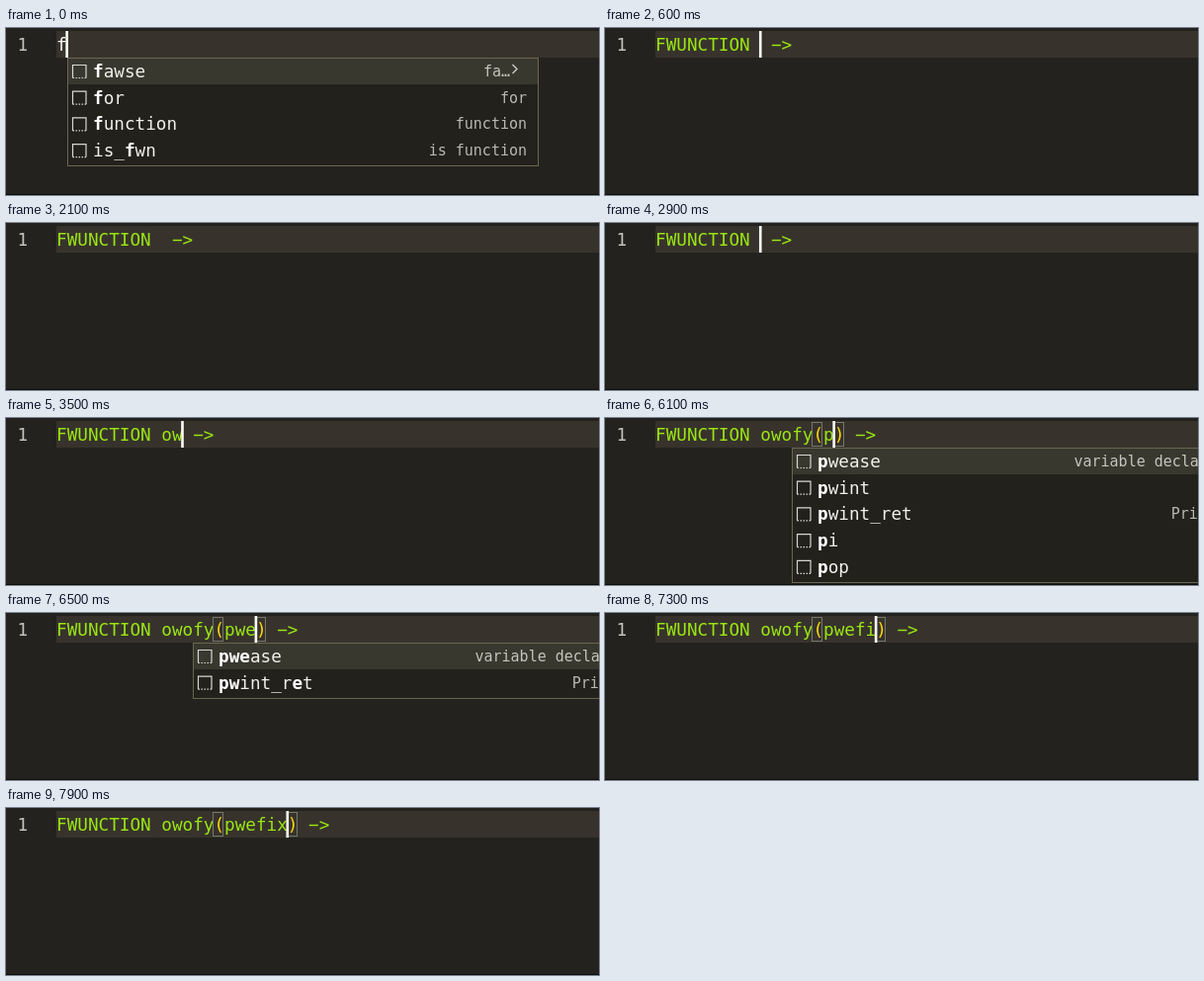
These frames come from a looping animation (600 by 169 pixels, 8 s). An HTML page with a canvas:

```html
<!DOCTYPE html>
<html>
<head>
<meta charset="utf-8">
<style>
  html, body { margin: 0; height: 100%; overflow: hidden; background: #23221e; }
  canvas { display: block; }
</style>
</head>
<body>
<canvas id="stage" width="600" height="169"></canvas>
<script>
const ctx = document.getElementById('stage').getContext('2d');
const LOOP = 8000, BLINK = 500;
const LEFT = 51, CHAR = 10.626, ROW = 26.7;
const POPUP_WIDTH = 477, POPUP_MAX_LEFT = 189;
const WHITE = '#f8f8f2', GREEN = '#9ae512', GOLD = '#ffd70a';
const FAMILY = '"DejaVu Sans Mono", monospace';
const CODE = `17.65px ${FAMILY}`, BOLD = `bold ${CODE}`, SMALL = `15px ${FAMILY}`;

const fn = ['function', 'function'], or = ['or', 'or'];
const please = ['pwease', 'variable declaration'], printRet = ['pwint_ret', 'Print ret'];
const print = ['pwint', 'Print'];
const fItems = [['fawse', 'fawse'], ['for', 'for'], fn, ['is_fwn', 'is function']];
const pItems = [please, print, printRet, ['pi', 'pi'], ['pop', 'pop']];

// Each edit: time, text before the cursor, text after it, suggestions.
const KEYWORD = 'FWUNCTION ', CALL = KEYWORD + 'owofy(';
const edits = [
  [0, 'f', '', fItems],
  [100, 'fu', '', [fn]],
  [200, 'fun', '', [fn]],
  [400, 'func', '', [fn]],
  [600, KEYWORD, ' −>'],
  [2700, KEYWORD + 'o', ' −>', [or]],
  [2900, KEYWORD, ' −>'],
  [3400, KEYWORD + 'o', ' −>', [or]],
  [3500, KEYWORD + 'ow', ' −>'],
  [4200, KEYWORD + 'owo', ' −>'],
  [4400, KEYWORD + 'owof', ' −>'],
  [4600, KEYWORD + 'owofy', ' −>'],
  [4900, CALL, ') −>'],
  [5900, CALL + 'p', ') −>', pItems],
  [6200, CALL + 'pw', ') −>', [please, print, printRet]],
  [6500, CALL + 'pwe', ') −>', [please, printRet]],
  [7000, CALL + 'pwef', ') −>'],
  [7300, CALL + 'pwefi', ') −>'],
  [7600, CALL + 'pwefix', ') −>']
];

function rect(x, y, w, h, color) {
  ctx.fillStyle = color;
  ctx.fillRect(x, y, w, h);
}

function outline(x, y, w, h, color) {
  ctx.strokeStyle = color;
  ctx.lineWidth = 1;
  ctx.strokeRect(x + 0.5, y + 0.5, w - 1, h - 1);
}

function write(text, x, y, font, color, align = 'left') {
  ctx.font = font;
  ctx.fillStyle = color;
  ctx.textAlign = align;
  ctx.fillText(text, x, y);
}

function drawCode(text, color) {
  [...text].forEach((char, i) => {
    const x = LEFT + i * CHAR, bracket = '()'.includes(char);
    if (bracket) outline(Math.round(x) - 1, 4, 11, 25, '#74796c');
    write(char, x, 23, CODE, bracket ? GOLD : color);
  });
}

function drawIcon(x, y) {
  ctx.strokeStyle = '#d8d8d2';
  ctx.lineWidth = 1.2;
  ctx.beginPath();
  ctx.moveTo(x, y + 13);
  ctx.lineTo(x, y);
  ctx.lineTo(x + 13.5, y);
  ctx.lineTo(x + 13.5, y + 13);
  ctx.stroke();
  ctx.setLineDash([1.5, 1.5]);
  ctx.beginPath();
  ctx.moveTo(x, y + 13);
  ctx.lineTo(x + 14, y + 13);
  ctx.stroke();
  ctx.setLineDash([]);
}

function drawLabel(label, typed, x, y) {
  let matched = 0;
  [...label].forEach((char, i) => {
    const hit = char === typed[matched];
    if (hit) matched++;
    write(char, x + i * CHAR, y, hit ? BOLD : CODE, hit ? '#ffffff' : '#f0f0ea');
  });
}

function drawChevron(x, y) {
  ctx.strokeStyle = '#d0d0ca';
  ctx.lineWidth = 1.3;
  ctx.beginPath();
  ctx.moveTo(x, y);
  ctx.lineTo(x + 4.5, y + 4.5);
  ctx.lineTo(x, y + 9);
  ctx.stroke();
}

function drawPopup(items, typed, cursor) {
  const x = Math.min(Math.round(cursor), POPUP_MAX_LEFT), right = x + POPUP_WIDTH - 12;
  const height = Math.round(items.length * ROW + 3.5);
  rect(x, 30, POPUP_WIDTH, height, '#22211c');
  rect(x + 1, 31, POPUP_WIDTH - 2, 26, '#38382f');
  outline(x, 30, POPUP_WIDTH, height, '#69664f');
  items.forEach(([label, detail], i) => {
    const y = 50 + i * ROW;
    drawIcon(x + 5.5, y - 12.5);
    drawLabel(label, typed, x + 26, y);
    if (i) {
      write(detail, right, y - 1, SMALL, '#b9b8b0', 'right');
    } else {
      write(detail.slice(0, -3) + '…', right - 17, y - 1, SMALL, '#c6c5bd', 'right');
      drawChevron(right - 14.5, y - 13);
    }
  });
}

function draw(now) {
  const t = now % LOOP;
  const [start, before, after, items] = edits.findLast(edit => edit[0] <= t);
  const cursor = LEFT + before.length * CHAR;

  rect(0, 0, 600, 169, '#23221e');
  rect(LEFT, 3, 549, 27, '#37332c');
  rect(0, 168, 600, 1, '#0c0c0a');
  write('1', 11.5, 23, CODE, '#c4c4be');
  drawCode(before + after, after ? GREEN : WHITE);
  if (items) drawPopup(items, before.match(/\w+$/)[0], cursor);
  if (Math.floor((t - start) / BLINK) % 2 === 0) rect(cursor - 1.3, 3, 2.6, 27, '#fbfbf6');
  requestAnimationFrame(draw);
}
requestAnimationFrame(draw);
</script>
</body>
</html>
```
